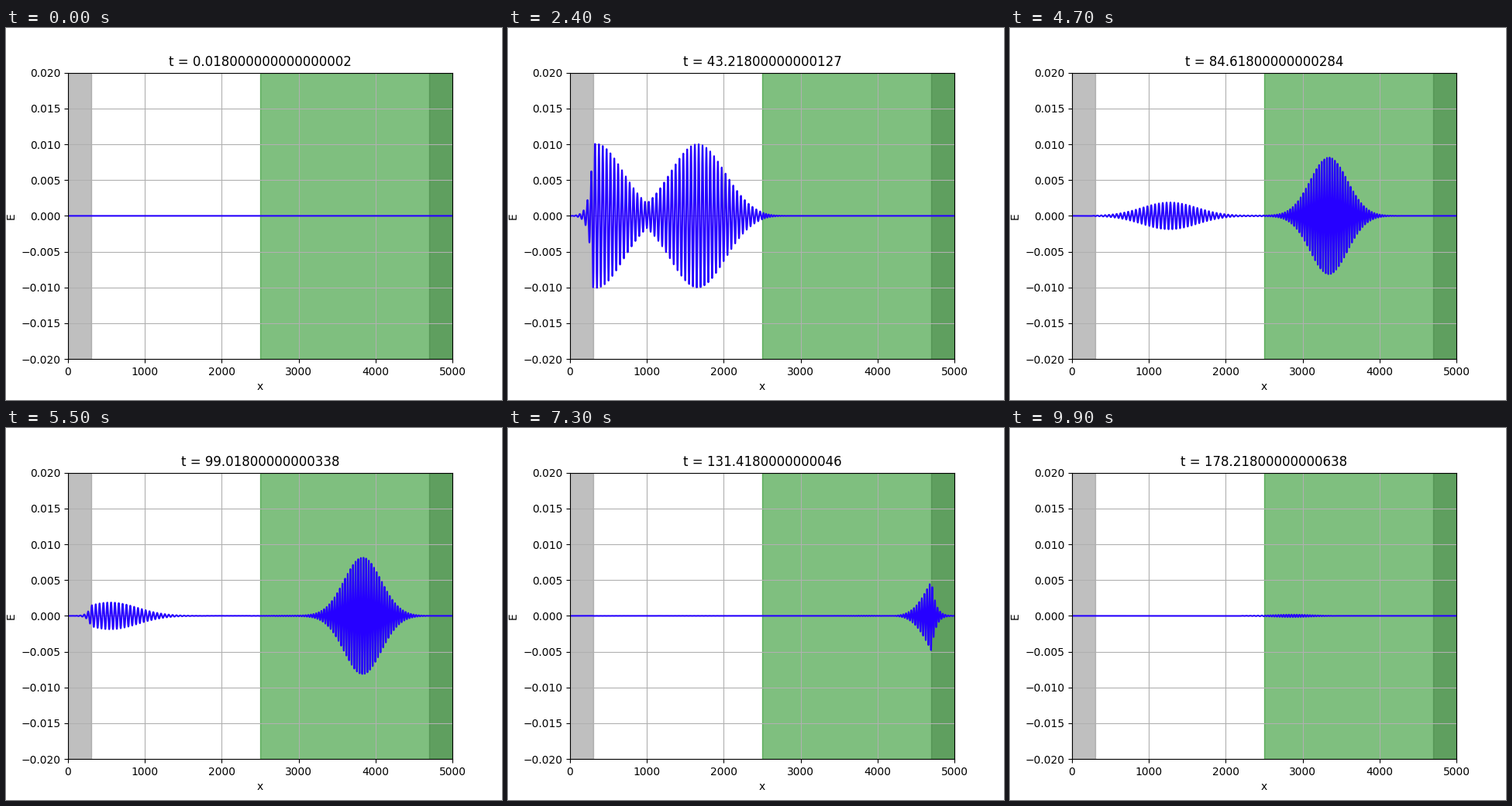
Write a matplotlib script that moves like this. It is 640x480 px and loops after 10000 ms.

```python
import numpy as np
import matplotlib.pyplot as plt
from matplotlib.animation import FuncAnimation

# 1D FDTD wave packet hitting a dielectric, with lossy absorbers at both ends
CELLS, FRAMES, STEPS = 5000, 100, 100
SOURCE, GLASS, PAD = 1000, 2500, 300
DX = 0.02
DT = 0.9 * DX
INDEX = 1.46


def pulse(t):
    return np.exp(-((t - 30) / 10) ** 2) * np.sin(2 * np.pi * t)


def simulate():
    eps = np.ones(CELLS)
    eps[GLASS:] = INDEX ** 2
    sigma = np.zeros(CELLS)
    sigma[:PAD] = sigma[-PAD:] = 1.0

    loss_e = sigma * DT / (2 * eps)
    loss_h = sigma[:-1] * DT / 2
    keep_e = ((1 - loss_e) / (1 + loss_e))[1:-1]
    gain_e = (DT / DX / eps / (1 + loss_e))[1:-1]
    keep_h = (1 - loss_h) / (1 + loss_h)
    gain_h = DT / DX / (1 + loss_h)

    e, h = np.zeros(CELLS), np.zeros(CELLS - 1)
    t, times, fields = 0.0, [], []
    for n in range((FRAMES - 1) * STEPS + 1):
        t += DT
        h *= keep_h
        h += gain_h * (e[1:] - e[:-1])
        e[1:-1] *= keep_e
        e[1:-1] += gain_e * (h[1:] - h[:-1])
        e[SOURCE] -= DT * pulse(t)
        if n % STEPS == 0:
            times.append(t)
            fields.append(e.copy())
    return times, fields


times, fields = simulate()

fig, ax = plt.subplots(figsize=(6.4, 4.8), dpi=100)
ax.axvspan(0, PAD, color="gray", alpha=0.5)
ax.axvspan(CELLS - PAD, CELLS, color="gray", alpha=0.5)
ax.axvspan(GLASS, CELLS, color="green", alpha=0.5)
ax.set(xlim=(0, CELLS), ylim=(-0.02, 0.02), xlabel="x", ylabel="E")
ax.grid(True)
line, = ax.plot(np.arange(CELLS), fields[0], color="#2600ff")
title = ax.set_title("")


def draw(i):
    line.set_ydata(fields[i])
    title.set_text(f"t = {times[i]}")
    return line, title


anim = FuncAnimation(fig, draw, frames=FRAMES, interval=100,
                     repeat=True, repeat_delay=0, blit=False)
plt.show()
```
